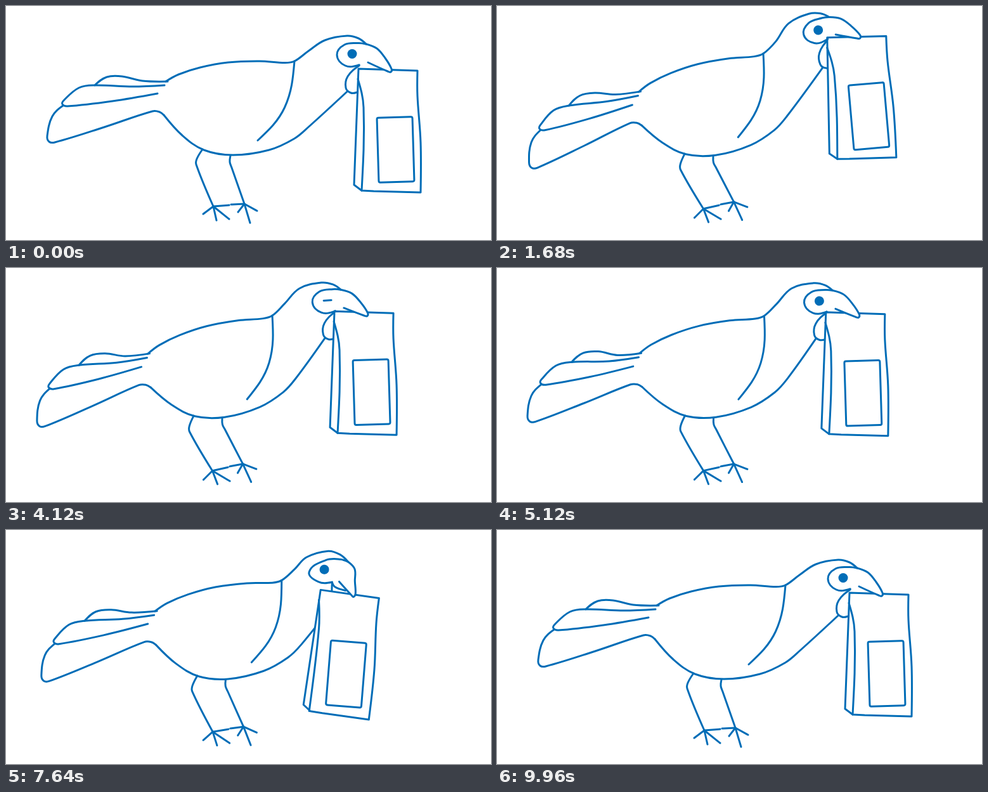
Animation of 765x369 px, one loop 10 s. Source, as an HTML page with a canvas:

```html
<!DOCTYPE html>
<html lang="en">
<head>
<meta charset="utf-8">
<title>Bird with a bag</title>
<style>
html, body { margin: 0; width: 100%; height: 100%; overflow: hidden; background: #fff; }
canvas { display: block; width: 765px; height: 369px; }
</style>
</head>
<body>
<canvas id="stage" width="765" height="369"></canvas>
<script>
const ctx = document.getElementById('stage').getContext('2d');
const LOOP = 10000, BLUE = '#006db7', RAD = Math.PI / 180;

const clamp = (v, lo, hi) => Math.max(lo, Math.min(hi, v));
const ramp = (t, from, to) => clamp((t - from) / (to - from), 0, 1);
const ease = (t, from, to) => (1 - Math.cos(Math.PI * ramp(t, from, to))) / 2;
const bump = (t, peak, reach) => ease(t, peak - reach, peak) - ease(t, peak, peak + reach);

// Pose at time t: angles in degrees, the rest as amounts from 0 to 1.
function poseAt(t) {
  const lift = ease(t, 0, 1500) - ease(t, 2100, 4120) + .4 * bump(t, 4620, 500);
  const droop = .7 * ease(t, 2100, 4120) + .3 * ease(t, 4120, 6200) - ease(t, 6500, 7600);
  return {
    lift, droop,
    tilt: -8.1 * (ease(t, 0, 1350) - .38 * ease(t, 4700, 6700) - .62 * ramp(t, 7500, 9960)),
    nod: 6.5 * droop - 6 * lift,
    turn: bump(t, 7640, 500) + .85 * bump(t, 8760, 500),
    swing: -3.3 * lift - 11 * (bump(t, 3640, 480) + bump(t, 4620, 480))
      + 6.4 * bump(t, 7640, 500) - 17.5 * bump(t, 8400, 800),
    wag: 6 * bump(t, 3200, 1500) + 5 * bump(t, 5600, 1600),
    blink: t >= 4040 && t < 4200
  };
}

function spin([x, y], [cx, cy], deg) {
  const c = Math.cos(deg * RAD), s = Math.sin(deg * RAD);
  return [cx + (x - cx) * c - (y - cy) * s, cy + (x - cx) * s + (y - cy) * c];
}

// Smooth curve through points; handles are a third of each segment.
function trace(pts) {
  const last = pts.length - 1;
  const handle = (i, len, sign) => {
    const [ax, ay] = pts[i - 1], [bx, by] = pts[i + 1];
    const k = sign * len * .36 / Math.hypot(bx - ax, by - ay);
    return [pts[i][0] + (bx - ax) * k, pts[i][1] + (by - ay) * k];
  };
  const toward = (p, q) => p.map((v, i) => v + (q[i] - v) * .55);
  ctx.lineTo(...pts[0]);
  for (let i = 0; i < last; i++) {
    const p = pts[i], q = pts[i + 1], len = Math.hypot(q[0] - p[0], q[1] - p[1]);
    let out = i > 0 && handle(i, len, 1);
    let into = i + 1 < last && handle(i + 1, len, -1);
    out = out || toward(p, into || q);
    into = into || toward(q, out);
    ctx.bezierCurveTo(...out, ...into, ...q);
  }
}

function curve(...pts) {
  ctx.beginPath();
  trace(pts);
  ctx.stroke();
}

function leg(thigh, knee, shin, foot, toes) {
  curve(thigh, knee, shin, foot);
  toes.forEach(toe => curve(foot, toe));
}

function drawTail(wag) {
  const bend = p => spin(p, [240, 180], wag * clamp((248 - p[0]) / 60, 0, 1));
  const feather = (...pts) => curve(...pts.map(bend));
  feather([140, 125], [159, 112], [183, 111], [215, 118], [255, 119]);
  feather([250, 125], [200, 127], [140, 125], [115, 129], [91, 149], [89, 155], [97, 158], [168, 150], [239, 138]);
  feather([90, 157], [73, 174], [65, 205], [68, 214], [77, 215], [155, 191], [231, 166], [242, 167], [249, 172]);
}

function drawBag([x, y], angle, turn) {
  ctx.save();
  ctx.translate(x, y);
  ctx.rotate(angle * RAD);

  ctx.beginPath();
  ctx.moveTo(-46, 0);
  trace([[47, 3], [47, 43], [52, 116], [52, 195]]);
  [[-22, 193], [-41, 192], [-53, 183]].forEach(p => ctx.lineTo(...p));
  ctx.closePath();
  ctx.fill();
  ctx.stroke();

  const shift = -4 * turn;
  curve([-47, 16], [-38 + shift, 61], [-41 + shift / 2, 192]);

  ctx.translate(12.5 + shift, 127.5);
  ctx.rotate(-1.7 * RAD);
  ctx.beginPath();
  ctx.roundRect(-28, -51, 56, 102, 2.5);
  ctx.stroke();
  ctx.restore();
}

function drawEye([x, y], nod, blink) {
  if (blink) {
    curve(...[-6, 6].map(dx => spin([x + dx, y], [x, y], nod)));
    return;
  }
  ctx.fillStyle = BLUE;
  ctx.beginPath();
  ctx.arc(x, y, 7.5, 0, Math.PI * 2);
  ctx.fill();
}

function draw(t) {
  const { lift, droop, tilt, nod, turn, swing, wag, blink } = poseAt(t);

  // Turning slides the face back and pulls the beak down.
  const turned = ([x, y]) => [
    x - turn * (6 + 1.1 * clamp(y - 60, 0, 15) + .0105 * Math.max(0, x - 555) * Math.max(0, y - 70)),
    y + turn * .3 * Math.max(0, x - 546)
  ];
  const eye = turned([546, 75.5]);
  const place = p => {
    const [x, y] = spin(p, eye, nod);
    return [x - 2 * droop, y - 13 * lift];
  };
  const head = (...pts) => pts.map(p => place(turned(p)));

  ctx.fillStyle = '#fff';
  ctx.fillRect(0, 0, 765, 369);
  ctx.strokeStyle = BLUE;
  ctx.lineWidth = 3;
  ctx.lineCap = ctx.lineJoin = 'round';

  ctx.save();
  ctx.translate(353, 328);
  ctx.rotate(tilt * RAD);
  ctx.translate(-353, -328);

  drawTail(wag);
  leg([310, 226], [301, 241], [300, 250], [327, 316], [[352, 314], [311, 328], [332, 338], [352, 336]]);
  leg([354, 236], [353, 246], [356, 255], [376, 312], [[355, 313], [366, 325], [385, 342], [396, 323]]);
  curve([455, 87], [439.5, 160], [397, 212]);

  curve([252, 119], [272, 108], [306, 97], [350, 89], [400, 87], [440, 89.5], [455, 87], [477, 71],
    ...head([503, 54], [538, 47], [556, 51], [568, 60]));
  curve([249, 172], [278, 204], [312, 227], [358, 235], [415, 227], [455, 209], [478, 190],
    place([538, 135 - 9 * turn]));

  const [tx, ty] = turned([557, 94]);
  const narrow = 1 - .9 * turn;
  curve(...[[0, 0], [-18, 17], [-21, 35], [-13, 43], [-3, 42]]
    .map(([dx, dy]) => place([tx + dx * narrow, ty + dy])));

  const [[hx, hy]] = head([602, 99]);
  drawBag([hx - 5 * turn, hy - 4 * droop], swing - tilt, turn);

  ctx.beginPath();
  trace(head([568, 60], [585, 67], [598, 82], [608, 99], [607, 104], [602, 103], [571, 89]));
  ctx.fill();
  ctx.stroke();

  curve(...head([568, 60], [556, 58.5], [534, 61], [522, 77], [535, 94], [557, 93]));
  const [lx, ly] = turned([557, 93]);
  curve(...[[0, 0], [4, 8], [20, 15]].map(([dx, dy]) => place([lx + dx * turn, ly + dy * turn])));
  drawEye(place(eye), nod, blink);
  ctx.restore();
}

const start = performance.now();
function tick() {
  draw((performance.now() - start) % LOOP);
  requestAnimationFrame(tick);
}
tick();
</script>
</body>
</html>
```
